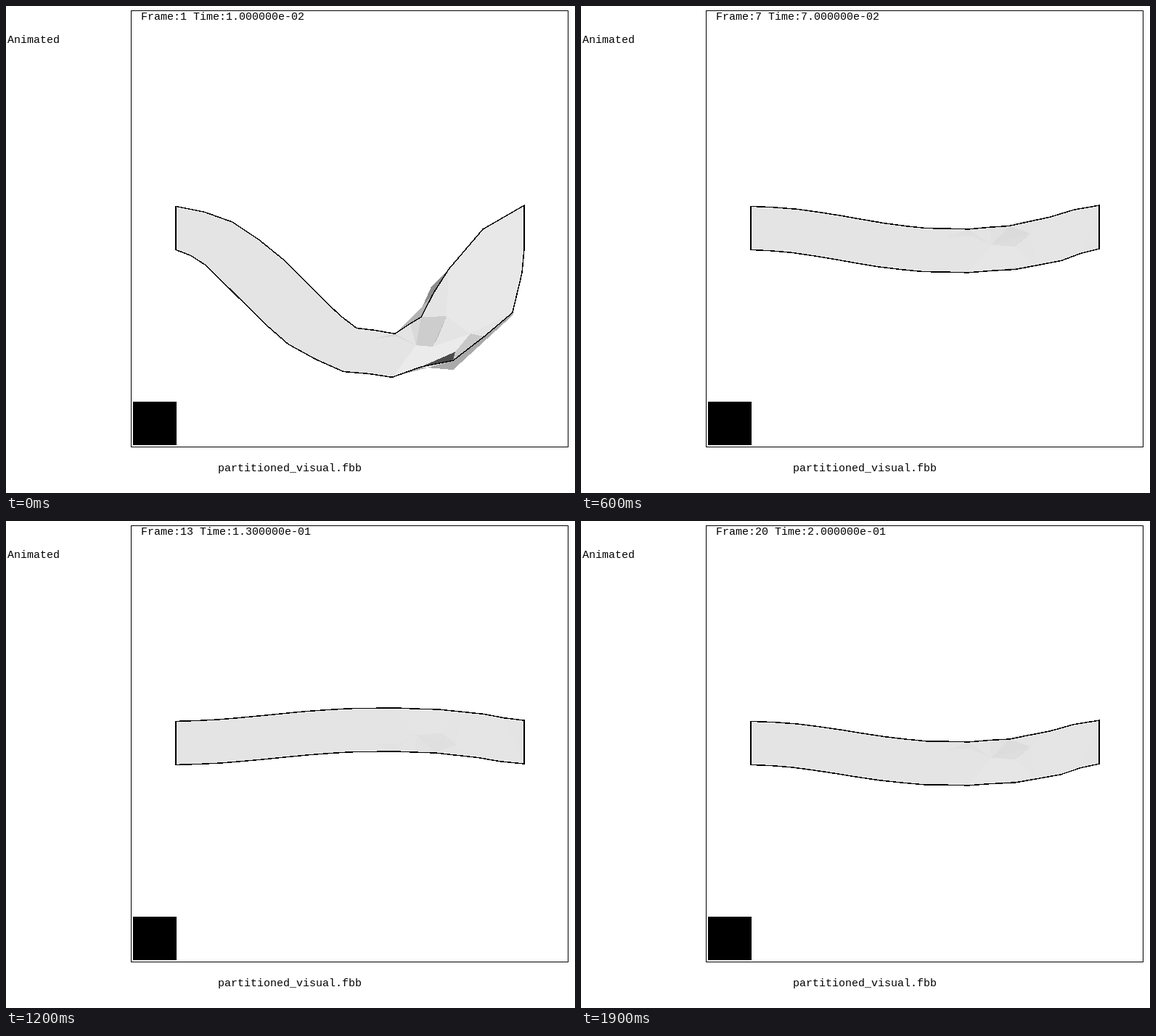
An HTML page that plays this animation: 784x672 px, repeating every 2000 ms.

```html
<!DOCTYPE html>
<html>
<head>
<meta charset="utf-8">
<style>
  html, body { margin: 0; width: 100%; height: 100%; overflow: hidden; background: #fff; }
  svg { display: block; shape-rendering: crispEdges; }
  text { font: 15px "Liberation Mono", "Noto Sans Mono", monospace; white-space: pre; }
</style>
</head>
<body>
<svg width="784" height="672" viewBox="0 0 784 672">
  <rect x="172.5" y="6.5" width="602" height="602" fill="none" stroke="#000"/>
  <rect x="175" y="546" width="60" height="60"/>
  <text x="2" y="51">Animated</text>
  <text id="label" x="186" y="19"></text>
  <text x="292" y="642">partitioned_visual.fbb</text>
  <g id="beam"></g>
</svg>
<script>
const beam = document.getElementById('beam');
const label = document.getElementById('label');

// Beam nodes every 30 px: sideways shift and sag at full deflection.
const shift = [0, 9.5, 18, 24, 27, 27, 25, 17, 9, 4, 2, -7, -22, -35, -44, -27, 0];
const sag = [0, 8, 22, 46, 73, 103, 131, 152, 169, 172, 177, 163, 154, 121, 88, 33, 0];
const FULL = 177;

// A node is [rest x, offset from the axis, shift, sag].
const edge = side => sag.map((dy, i) => [234 + 30 * i, 30 * side, -side * shift[i], dy]);
const top_ = edge(-1);
const bottom = edge(1);
const outline = [...top_, ...[...bottom].reverse()];

const farTop = [594, -30, -20, 139];
const farTopRight = [624, -30, -38, 112];
const farBottom = [594, 30, 22, 167];
const farBottomRight = [654, 30, 45, 91];
const foldTip = [594, 30, 25, 142];
const foldRight = [624, 30, 16, 117];
const dentRight = [622, -17, -15, 140];
const dentLow = [600, -4, -12, 169];
const dentLeft = [566, -7, -1, 170];
const creaseLeft = [504, -18, 1, 172];

const outerFacets = [
  ['#b4b4b4', [top_[10], farTop, farTopRight, top_[13], top_[12], top_[11]]],
  ['#8c8c8c', [farTopRight, top_[14], top_[13], farTop]],
  ['#aaaaaa', [bottom[10], bottom[11], farBottom, farBottomRight, bottom[14], bottom[13], bottom[12]]],
];
const innerFacets = [
  ['#ebebeb', [dentLeft, dentLow, foldRight, foldTip, bottom[11], bottom[10]]],
  ['#e8e8e8', [dentRight, top_[14], top_[15], top_[16], bottom[15], bottom[14], foldRight]],
  ['#d6d6d6', [creaseLeft, top_[10], dentLeft, [534, -20, 3, 170]]],
  ['#d9d9d9', [top_[11], top_[12], dentRight, dentLeft]],
  ['#cdcdcd', [top_[12], dentRight, dentLow, dentLeft]],
  ['#b4b4b4', [dentRight, [606, -8, -10, 158], dentLow]],
  ['#c8c8c8', [foldRight, bottom[13], bottom[12], foldTip]],
  ['#4c4c4c', [bottom[11], foldTip, bottom[12]]],
];

function deflection(n) {
  const envelope = 21.7 * (10 - n) * Math.exp(-n / 10);
  return n % 2 ? envelope : -envelope;
}

function draw(n) {
  const u = deflection(n);
  const dir = u < 0 ? -1 : 1;
  const s = Math.abs(u) / FULL;
  const place = ([x, offset, dx, dy]) => {
    const axis = 306.4 - (x - 234) / 360;
    return (x + s * dx).toFixed(1) + ',' + (axis + dir * (offset + s * dy)).toFixed(1);
  };
  const polygon = (nodes, attrs) => `<polygon points="${nodes.map(place).join(' ')}" ${attrs}/>`;
  const opacity = Math.min(1, 1.6 * s);
  const facet = ([color, nodes]) => polygon(nodes, `fill="${color}" opacity="${opacity}"`);

  beam.innerHTML =
    outerFacets.map(facet).join('') +
    polygon(outline, 'fill="#e4e4e4"') +
    innerFacets.map(facet).join('') +
    polygon(outline, 'fill="none" stroke="#000" stroke-width="1.5"');
  label.textContent = `Frame:${n} Time:${(n / 100).toExponential(6).replace('e-', 'e-0')}`;
}

let shown = 0;
const start = performance.now();
function tick() {
  const n = 1 + Math.floor(Math.max(0, performance.now() - start) / 100) % 20;
  if (n !== shown) draw(shown = n);
  requestAnimationFrame(tick);
}
tick();
</script>
</body>
</html>
```
